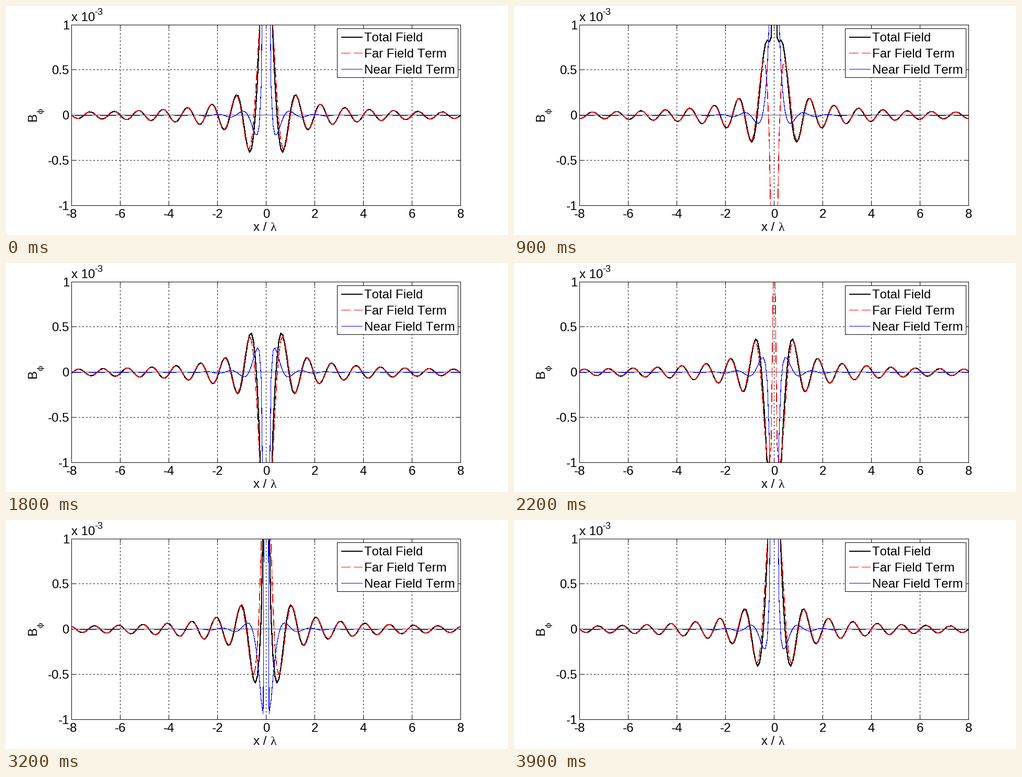
Recreate the animation shown at these times as a matplotlib script. Size 960 px wide and 440 px high, loop 4000 ms.

```python
import numpy as np
import matplotlib.pyplot as plt
from matplotlib.animation import FuncAnimation
from matplotlib.patches import Rectangle

plt.rcParams["path.simplify"] = False
plt.rcParams["text.kerning_factor"] = 6    # plain advances, no kerning

W, H, DPI = 960, 440, 80
LEFT, RIGHT, TOP, BOTTOM = 125.5, 869.5, 36.5, 383.5
X_UNIT = (RIGHT - LEFT) / 16
Y_UNIT = (BOTTOM - TOP) / 2
X0, Y0 = (LEFT + RIGHT) / 2, (TOP + BOTTOM) / 2
FRAMES = 40
AMPLITUDE = 0.276          # in units of 1e-3
SANS, SERIF = "Liberation Sans", "Liberation Serif"


def pt(pixels):
    return pixels * 72 / DPI


def px(x):
    return X0 + X_UNIT * x


def py(y):
    return Y0 - Y_UNIT * y


fig = plt.figure(figsize=(W / DPI, H / DPI), dpi=DPI, facecolor="white")
ax = fig.add_axes([0, 0, 1, 1])
ax.set_xlim(0, W)
ax.set_ylim(H, 0)
ax.axis("off")


def line(xs, ys, color="black", width=1, dash=None, z=1):
    # Aliased strokes fill every pixel they touch, so draw them thinner.
    stroke = width - 0.85
    style = (0, [d / stroke for d in dash]) if dash else "-"
    return ax.plot(xs, ys, color=color, lw=pt(stroke), ls=style, zorder=z,
                   antialiased=False, snap=False, solid_capstyle="butt")[0]


def label(x, y, s, size=24, ha="left", font=SANS, **kw):
    ax.text(x, y, s, fontsize=pt(size), ha=ha, va="baseline", family=font,
            zorder=12, **kw)


def frame_box(x0, y0, x1, y1, z, fill=None):
    if fill:
        ax.add_patch(Rectangle((x0, y0), x1 - x0, y1 - y0, facecolor=fill,
                               edgecolor="none", zorder=z, snap=False))
    for x in (x0, x1):
        line([x, x], [y0, y1], z=z)
    for y in (y0, y1):
        line([x0, x1], [y, y], z=z)


# Grid, ticks and tick labels
TICK = 7
DOTS = (2, 4)
for v in range(-8, 9, 2):
    x = np.floor(px(v)) + 0.5
    if abs(v) < 8:
        line([x, x], [BOTTOM, TOP], dash=DOTS)
        line([x, x], [TOP, TOP + TICK])
        line([x, x], [BOTTOM, BOTTOM - TICK])
    label(x, 407, str(v), ha="center")
for v in (-1, -0.5, 0, 0.5, 1):
    y = np.floor(py(v) - 0.5) + 0.5
    if abs(v) == 0.5:
        line([LEFT, RIGHT], [y, y], dash=DOTS)
    if abs(v) < 1:
        line([LEFT, LEFT + TICK], [y, y])
        line([RIGHT, RIGHT - TICK], [y, y])
    label(121, y + 8.5, f"{v:g}", ha="right")

frame_box(LEFT, TOP, RIGHT, BOTTOM, 8)
line([LEFT, RIGHT], [209.5, 209.5], color="#404090", z=6)

# Axis texts
label(125, 29, "x 10")
label(169, 17, "-3", size=18)
label(473, 432, "x / ")
label(505, 432, "λ", font=SERIF)
turned = dict(rotation=90, rotation_mode="anchor")
label(58, 221, "B", **turned)
label(70, 207, "ϕ", size=15, font="DejaVu Serif", **turned)

# Curves
STYLES = [
    ("Total Field", dict(color="black", width=2)),
    ("Far Field Term", dict(color="red", dash=(17, 7))),
    ("Near Field Term", dict(color="blue")),
]
x = np.linspace(-8, 8, 200)
r = np.abs(x)
k = 2 * np.pi
clip = Rectangle((LEFT, TOP), RIGHT - LEFT, BOTTOM - TOP, visible=False)
ax.add_patch(clip)
curves = []
for i, (_, style) in enumerate(STYLES):
    curve = line(px(x), np.full_like(x, Y0), z=3 + i, **style)
    curve.set_clip_path(clip)
    curves.append(curve)

# Legend
frame_box(633.5, 43.5, 864.5, 137.5, 10, "white")
for i, (name, style) in enumerate(STYLES):
    y = (60, 90.5, 121.5)[i]
    line([641, 682], [y, y], z=11, **style)
    label(685, y + 8.3, name)


def update(n):
    phase = k * r - np.pi / 2 - 2 * np.pi * n / (FRAMES - 1)
    far = AMPLITUDE * np.cos(phase) / r
    near = -AMPLITUDE * np.sin(phase) / (k * r ** 2)
    for curve, field in zip(curves, (far + near, far, near)):
        curve.set_ydata(py(field))
    return curves


anim = FuncAnimation(fig, update, frames=FRAMES, interval=100, repeat=True,
                     repeat_delay=0, blit=False)
plt.show()
```
